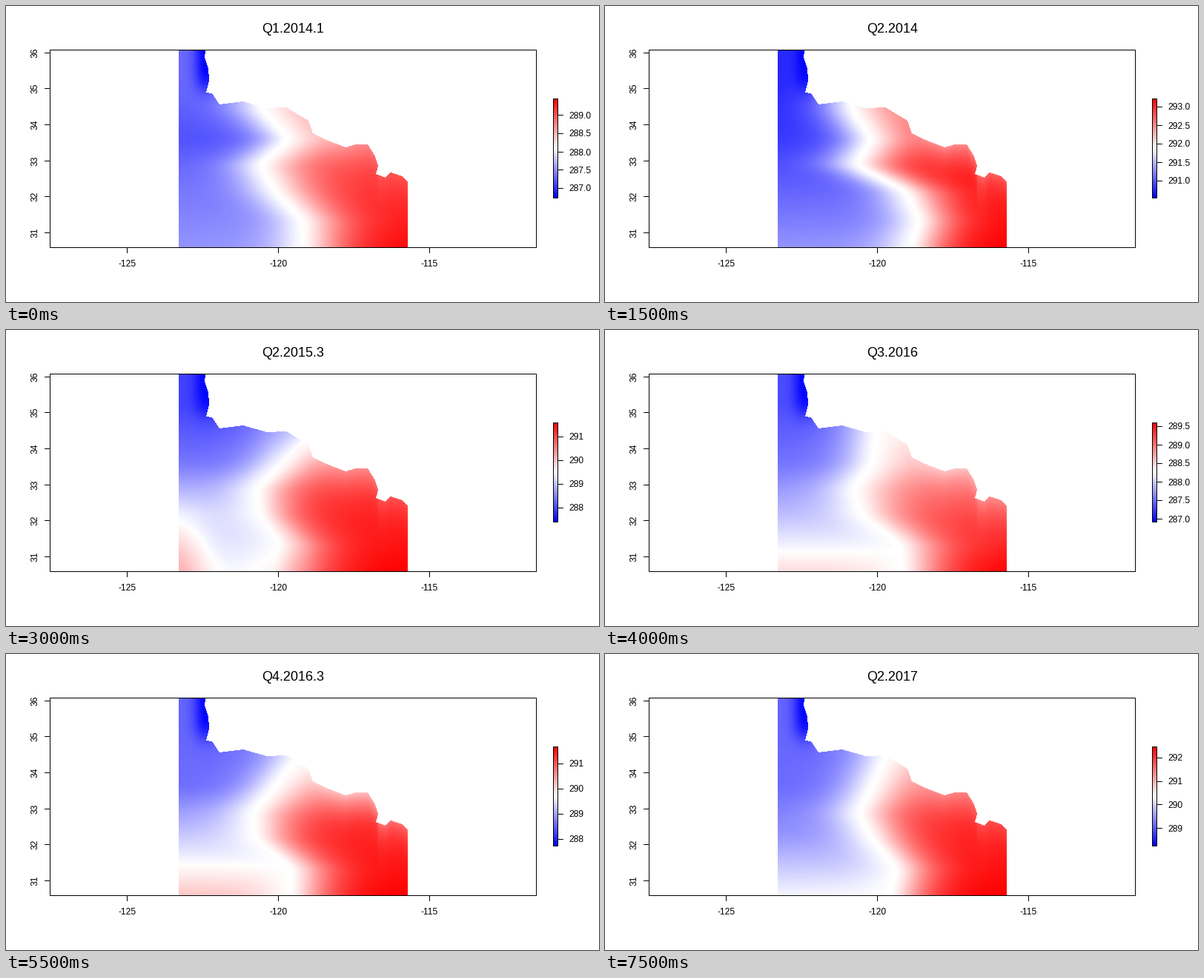
A matplotlib script for the animation above (8000 ms loop, 800 by 400 pixels).

```python
import numpy as np
import matplotlib.pyplot as plt
from matplotlib.animation import ArtistAnimation
from matplotlib.colors import LinearSegmentedColormap
from matplotlib.patches import Rectangle
from matplotlib.path import Path

W, H, DPI = 800, 400, 100
PT = 72 / DPI
plt.rcParams["font.family"] = "Liberation Sans"
CMAP = LinearSegmentedColormap.from_list("bwr", ["#0000ff", "#ffffff", "#ff0000"], N=255)

# Pixel centres of the outlines, and the edges of the raster
LEFT, RIGHT, TOP, BOTTOM = 59.5, 715.5, 59.5, 326.5
BAR_LEFT, BAR_RIGHT, BAR_TOP, BAR_BOTTOM = 738.5, 744.5, 125.5, 259.5
X0, X1, Y0, Y1 = 233, 542, 59, 327

COAST = [
    (270, 50), (268, 70), (273, 84), (274, 101), (270, 117), (278, 118),
    (288, 133), (320, 129), (352, 138), (378, 137), (408, 155), (414, 172),
    (430, 180), (458, 191), (472, 187), (488, 187), (498, 203), (502, 216),
    (499, 227), (512, 232), (519, 225), (535, 230), (543, 239),
]
X, Y = np.meshgrid(np.arange(X0, X1) + 0.5, np.arange(Y0, Y1) + 0.5)
SEA = Path(COAST + [(543, 330), (230, 330), (230, 50)]).contains_points(
    np.column_stack([X.ravel(), Y.ravel()])).reshape(X.shape)
DEPTH = np.maximum(Y - np.interp(X, *zip(*COAST[6:])), 0)


def curve(ys, values):
    """Smooth line through a few keys, one value per raster row."""
    rows = np.arange(Y0 - 15, Y1 + 15) + 0.5
    window = np.hanning(31)
    return np.convolve(np.interp(rows, ys, values), window / window.sum(), "valid")[:, None]


def rise(d, width):
    return 1 - np.exp(-(np.maximum(d, 0) / width) ** 1.5)


def sea(front, west, east, cool, width=52, warm_sw=0):
    """Cold and warm water on either side of a wavy front, from -100 to 100."""
    d = X - curve((140, 180, 215, 250, 290, 325), front)
    v = curve((100, 180, 245, 325), west) * rise(-d, 45)
    v = v + curve((150, 230, 325), east) * rise(d, width)
    v += warm_sw * np.exp(-((X - 225) / 45) ** 2 - ((Y - 335) / 90) ** 2)
    v -= cool * np.exp(-DEPTH / 20) / (1 + np.exp((430 - X) / 12))
    upwelling = np.exp(-((X - 270) / 16) ** 2) / (1 + np.exp((Y - 110) / 8))
    return np.clip(v + (-100 - v) * upwelling, -100, 100)


# Surfaces at key layers; those between are blended
KEYS = {
    0: sea((345, 382, 342, 362, 400, 400), (-60, -68, -54, -42), (45, 78, 98), 10, 60),
    3: sea((333, 360, 338, 405, 424, 412), (-88, -78, -62, -42), (60, 92, 100), 30, 50),
    5: sea((420, 376, 338, 340, 368, 355), (-76, -55, -18, -16), (50, 92, 100), 12, 47, 58),
    8: sea((365, 360, 335, 345, 398, 400), (-70, -55, -28, 13), (25, 66, 100), 20, 60),
    11: sea((392, 362, 333, 336, 385, 383), (-60, -57, -22, 22), (25, 85, 100), 28, 55),
    13: sea((372, 366, 350, 351, 370, 378), (-84, -66, -30, -6), (45, 90, 100), 10, 48),
    15: sea((378, 360, 342, 360, 393, 385), (-60, -58, -42, -3), (45, 85, 100), 15),
}

# Layer name and the limits of its colour scale
LAYERS = [
    ("Q1.2014.1", 286.74, 289.45), ("Q1.2014.2", 287.25, 290.70),
    ("Q1.2014.3", 288.60, 292.20), ("Q2.2014", 290.53, 293.23),
    ("Q2.2015.1", 288.90, 291.62), ("Q2.2015.2", 286.30, 291.51),
    ("Q2.2015.3", 287.40, 291.60), ("Q2.2016", 287.80, 290.55),
    ("Q3.2016", 286.92, 289.59), ("Q4.2016.1", 287.20, 290.50),
    ("Q4.2016.2", 287.45, 291.10), ("Q4.2016.3", 287.74, 291.66),
    ("Q1.2017.1", 287.60, 290.35), ("Q1.2017.2", 285.53, 290.72),
    ("Q1.2017.3", 287.10, 291.40), ("Q2.2017", 288.26, 292.46),
]


def surface(i):
    a = max(k for k in KEYS if k <= i)
    b = min(k for k in KEYS if k >= i)
    t = (i - a) / max(b - a, 1)
    return KEYS[a] * (1 - t) + KEYS[b] * t


fig = plt.figure(figsize=(W / DPI, H / DPI), dpi=DPI, facecolor="white")
ax = fig.add_axes([0, 0, 1, 1])
ax.set(xlim=(0, W), ylim=(H, 0), autoscale_on=False)
ax.axis("off")


def line(xs, ys):
    return ax.plot(xs, ys, color="black", lw=PT, snap=False, solid_capstyle="butt")[0]


def label(x, y, text, size=12, ha="center", **kw):
    return ax.text(x, y, text, size=size * PT, ha=ha, va="baseline", **kw)


def outline(x0, x1, y0, y1):
    ax.add_patch(Rectangle((x0, y0), x1 - x0, y1 - y0, fill=False, lw=PT,
                           snap=False, joinstyle="miter", zorder=3))


def picture(data, extent, **kw):
    return ax.imshow(data, cmap=CMAP, vmin=-100, vmax=100, extent=extent,
                     aspect="auto", interpolation="nearest", **kw)


def pixel(v):
    return np.floor(v) + 0.5


outline(LEFT, RIGHT, TOP, BOTTOM)
outline(BAR_LEFT, BAR_RIGHT, BAR_TOP, BAR_BOTTOM)
picture(np.linspace(-100, 100, 255)[:, None],
        (BAR_LEFT, BAR_RIGHT, BAR_BOTTOM, BAR_TOP), origin="lower")
for lon in (-125, -120, -115):
    x = pixel(367.5 + 40.78 * (lon + 120))
    line([x, x], [BOTTOM, 334])
    label(x, 352, str(lon))
for lat in range(31, 37):
    y = pixel(63 + 48.7 * (36 - lat))
    line([52, LEFT], [y, y])
    label(42.4, y - 0.5, str(lat), rotation=90, rotation_mode="anchor")


def layer(i):
    name, lo, hi = LAYERS[i]
    step, fmt = (0.5, "{:.1f}") if hi - lo < 3 else (1, "{:.0f}")
    artists = [
        picture(np.ma.array(surface(i), mask=~SEA), (X0, X1, Y1, Y0)),
        label((LEFT + RIGHT) / 2, 36, name, 18),
    ]
    for v in np.arange(np.ceil(lo / step), np.floor(hi / step) + 1) * step:
        y = pixel(BAR_BOTTOM - (v - lo) / (hi - lo) * (BAR_BOTTOM - BAR_TOP))
        artists += [line([BAR_RIGHT, 752], [y, y]),
                    label(759, y + 4, fmt.format(v), ha="left")]
    return artists


anim = ArtistAnimation(fig, [layer(i) for i in range(len(LAYERS))],
                       interval=500, repeat=True, repeat_delay=0, blit=False)
plt.show()
```
